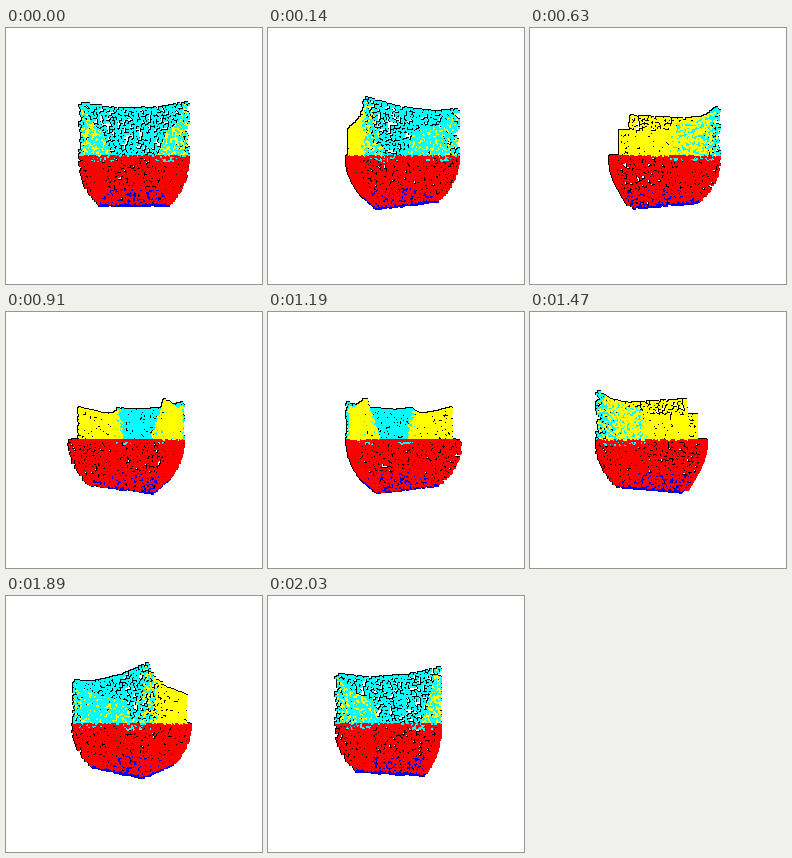
Recreate the animation shown at these times as a matplotlib script. Size 256 by 256 pixels, loop 2.1 s.

```python
import numpy as np
import matplotlib.pyplot as plt
from matplotlib.animation import FuncAnimation

SIZE, FRAMES, INTERVAL = 256, 30, 70
CAMERA = 178                 # distance from camera to the turning axis
HALF, FRONT = 41, -34        # half width of the chair, front end of the arms
DENSITY = 0.21               # points per unit of surface
RED, YELLOW, CYAN, BLUE = (255, 0, 0), (255, 255, 0), (0, 255, 255), (0, 0, 255)

rng = np.random.default_rng(4)
points, colors = [], []


def add(u, w, z, color):
    """Store points: u to the side, w to the rear, z up."""
    u, w, z = np.broadcast_arrays(u, w, z)
    points.append(np.column_stack([u, w, z]))
    colors.append(np.broadcast_to(color, (len(u), 3)))


def spread(low, high, n):
    return rng.uniform(low, high, n)


def count(area, density=DENSITY):
    return int(area * density)


def with_folds(values, step, share):
    """Pull a share of the values onto evenly spaced folds."""
    snap = rng.random(len(values)) < share
    return np.where(snap, np.round(values / step) * step, values)


def arm_height(w):
    return 29.5 + 12 * np.clip((w - FRONT) / (HALF - FRONT), 0, 1) ** 5.5


def back_height(u):
    return 37 + 4.5 * np.clip((np.abs(u) - 15) / 26, 0, 1) ** 1.2


def inner(t):
    return 28 + 11 * t


def add_arm(side):
    n = count(75 * 32)
    for inside in (False, True):
        w = with_folds(spread(FRONT, HALF, n), 10, 0.12)
        t = rng.random(n)
        u = inner(t) if inside else HALF
        rear = rng.random(n) < 0.6 * np.clip((w - 28) / 13, 0, 1)
        add(side * u, w, t * arm_height(w), np.where(rear[:, None], CYAN, YELLOW))
    n = count(8 * 30, 0.4)
    t = rng.random(n)
    add(side * spread(inner(t), HALF, n), FRONT, t * arm_height(FRONT), YELLOW)
    w = spread(FRONT, HALF - 6, 50)
    add(side * spread(39, HALF, 50), w, arm_height(w), YELLOW)


def add_back():
    n = count(82 * 40)
    for inside in (False, True):
        u = with_folds(spread(-HALF, HALF, n), 14, 0.14)
        t = rng.random(n)
        low = np.where((np.abs(u) > 17) & (np.abs(u) < 36), -4, 0)
        z = low + t * (back_height(u) - low)
        add(u, inner(t) if inside else HALF, z, CYAN)
    u = spread(-HALF, HALF, 70)
    add(u, spread(39, HALF, 70), back_height(u), CYAN)


def add_seat():
    n = count(84 * 41, 0.22)
    for side in (-1, 1):
        t, v = rng.random(n), rng.random(n)
        r = 42 - 12 * t ** 2.2
        add(side * r, -r - 3 + v * (2 * r + 3), -40 * t, RED)
        t, v = rng.random(n), spread(-1, 1, n)
        r = 42 - 12 * t ** 2.2
        add(v * r, r if side > 0 else -r - 3, -40 * t, RED)
    n = count(84 * 87, 0.18)
    add(spread(-42, 42, n), spread(-45, 42, n), spread(-0.4, 0.5, n), RED)
    n = count(60 * 60, 0.05)
    add(spread(-30, 30, n), spread(-31, 30, n), -39, RED)


def add_base():
    n = count(58 * 58, 0.12)
    add(spread(-29, 29, n), spread(-29, 29, n), -41, BLUE)
    n = 130
    for side in (-29, 29):
        add(spread(-29, 29, n), side, spread(-41.8, -39.3, n), BLUE)
        add(side, spread(-29, 29, n), spread(-41.8, -39.3, n), BLUE)


add_back()
for s in (-1, 1):
    add_arm(s)
add_seat()
add_base()
U, W, Z = np.vstack(points).T
COLORS = np.vstack(colors).astype(np.uint8)


def render(i):
    a = 2 * np.pi * i / FRAMES
    x = U * np.cos(a) + W * np.sin(a)
    near = W * np.cos(a) - U * np.sin(a)
    scale = CAMERA / (CAMERA - near)
    order = np.argsort(near)
    col = np.round(127.5 + x * scale).astype(int)[order]
    row = np.round(127.5 - Z * scale).astype(int)[order]

    img = np.full((SIZE, SIZE, 3), 255, np.uint8)
    for dy in (-1, 0, 1):
        for dx in (-1, 0, 1):
            img[row + dy, col + dx] = 0
    # 2 x 2 dots, painted from far to near
    rows = (row[:, None] + [0, 0, 1, 1]).ravel()
    cols = (col[:, None] + [0, 1, 0, 1]).ravel()
    img[rows, cols] = np.repeat(COLORS[order], 4, axis=0)
    return img


fig = plt.figure(figsize=(2.56, 2.56), dpi=100, facecolor="white")
ax = fig.add_axes([0, 0, 1, 1])
ax.axis("off")
view = ax.imshow(render(0), interpolation="nearest", aspect="auto")


def update(i):
    view.set_data(render(i))
    return (view,)


anim = FuncAnimation(fig, update, frames=FRAMES, interval=INTERVAL,
                     repeat=True, repeat_delay=0)
plt.show()
```
